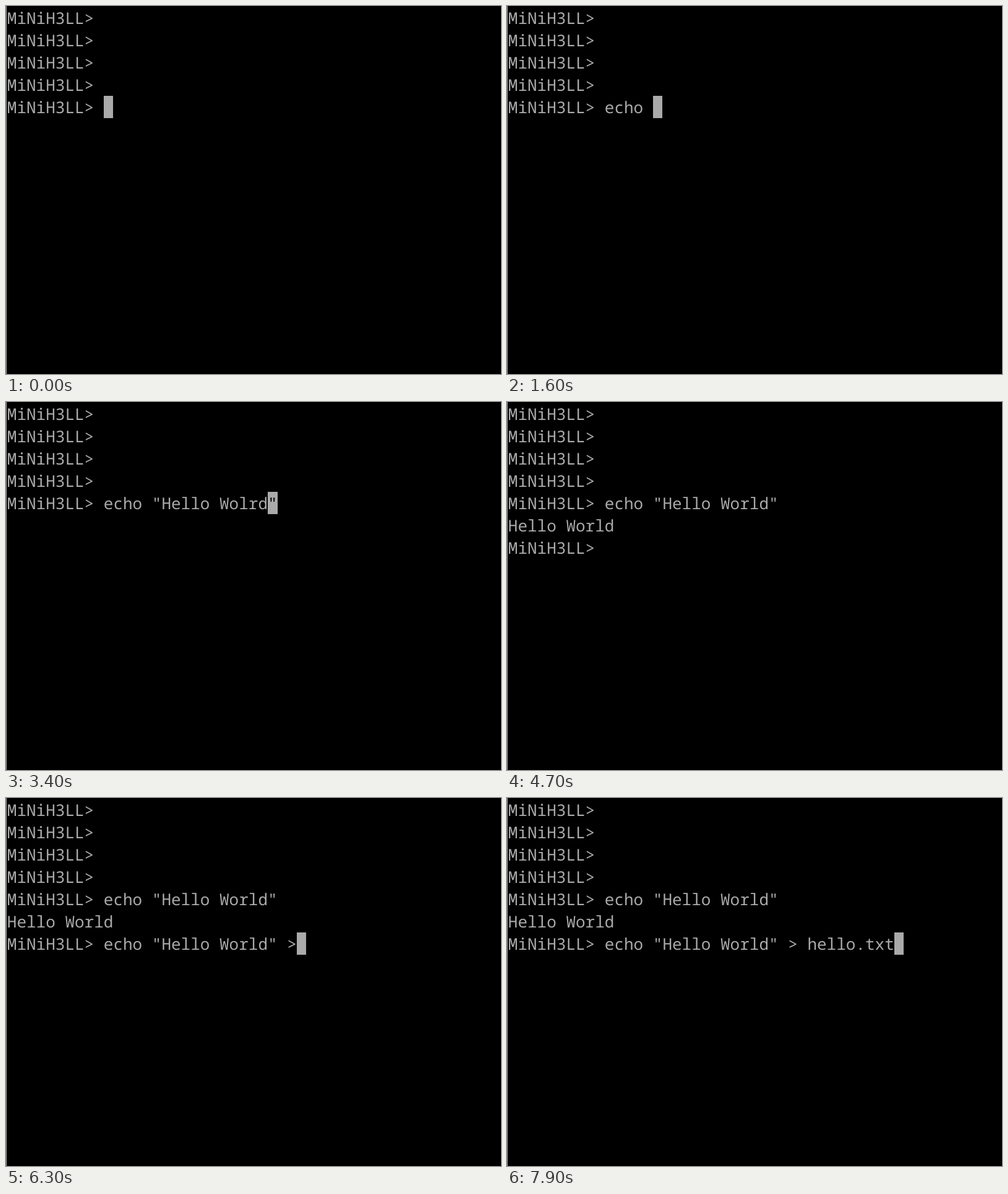
Write an HTML page that moves like this. It is 800x594 px and loops after 8000 ms.

```html
<!DOCTYPE html>
<html lang="en">
<head>
<meta charset="utf-8">
<title>Shell session</title>
<style>
  html, body { margin: 0; width: 100%; height: 100%; overflow: hidden; background: #000; }
  body { position: relative; }
  .edge { position: absolute; left: 0; top: 0; width: 1px; height: 100%; background: #aaa; }
  pre, .cursor {
    position: absolute;
    margin: 0;
    font: 26px/36px "Noto Sans Mono", "DejaVu Sans Mono", monospace;
    font-variant-ligatures: none;
    text-rendering: geometricPrecision;
    white-space: pre;
    color: #aaa;
  }
  pre { left: 1.8px; top: 1px; }
  .cursor { width: 15.6px; height: 36px; background: #aaa; color: #000; }
</style>
</head>
<body>
<div class="edge"></div>
<pre id="screen"></pre>
<div class="cursor" id="cursor"></div>
<script>
const LOOP = 8000, CELL = 15.6, LINE = 36, LEFT = 1.8, TOP = 1;
const PROMPT = 'MiNiH3LL> ';
const HELLO = 'echo "Hello World"';
const first = (PROMPT + '\n').repeat(4);
const second = first + PROMPT + HELLO + '\nHello World\n';

// [time, typed text]: "|" is the cursor, "_" marks its place while it is blinked off
const firstKeys = [
  [0, '|'], [100, '_'], [400, '|'],
  [700, 'e|'], [800, 'ec|'], [900, 'ech|'], [1100, 'echo |'],
  [1300, "echo '|"], [1400, "echo ''|"], [1500, "echo '|"], [1600, 'echo |'],
  [1800, 'echo "|'], [2000, 'echo ""|'], [2200, 'echo "|"'],
  [2500, 'echo "He|"'], [2600, 'echo "Hel|"'], [2700, 'echo "Hell|"'],
  [2800, 'echo "Hello|"'], [2900, 'echo "Hello |"'],
  [3100, 'echo "Hello W|"'], [3200, 'echo "Hello Wo|"'],
  [3300, 'echo "Hello Wolr|"'], [3400, 'echo "Hello Wolrd|"'],
  [3700, 'echo "Hello Wolr|"'], [3800, 'echo "Hello Wol|"'],
  [3900, 'echo "Hello Wo|"'], [4100, 'echo "Hello Wor|"'],
  [4300, 'echo "Hello World|"']
];
const secondKeys = [
  [4400, '|'], [4700, '_'], [5000, '|'], [5300, '_'],
  [5400, HELLO + '|'], [5700, HELLO + '_'], [6000, HELLO + ' |'],
  [6300, HELLO + ' >|'], [6400, HELLO + ' > |'], [6700, HELLO + ' > _'],
  [7000, HELLO + ' > h|'], [7100, HELLO + ' > he|'],
  [7200, HELLO + ' > hell|'], [7300, HELLO + ' > hello|'],
  [7600, HELLO + ' > hello.|'], [7700, HELLO + ' > hello.t|'],
  [7800, HELLO + ' > hello.tx|'], [7900, HELLO + ' > hello.txt|']
];

const toStep = (above, row) => ([time, typed]) => {
  const at = typed.search(/[|_]/);
  const text = typed.replace(/[|_]/, '');
  return {
    time, row,
    text: above + PROMPT + text,
    col: PROMPT.length + at,
    under: text[at] || '',
    on: typed[at] === '|'
  };
};
const steps = [
  ...firstKeys.map(toStep(first, 4)),
  ...secondKeys.map(toStep(second, 6))
];

const screenEl = document.getElementById('screen');
const cursorEl = document.getElementById('cursor');
let shown = null;

function draw(t) {
  const step = steps.filter(s => s.time <= t).pop();
  if (step === shown) return;
  shown = step;
  screenEl.textContent = step.text;
  cursorEl.textContent = step.under;
  cursorEl.style.left = LEFT + step.col * CELL + 'px';
  cursorEl.style.top = TOP + step.row * LINE + 'px';
  cursorEl.style.visibility = step.on ? 'visible' : 'hidden';
}

const start = performance.now();
function tick() {
  draw((performance.now() - start) % LOOP);
  requestAnimationFrame(tick);
}
tick();
</script>
</body>
</html>
```
